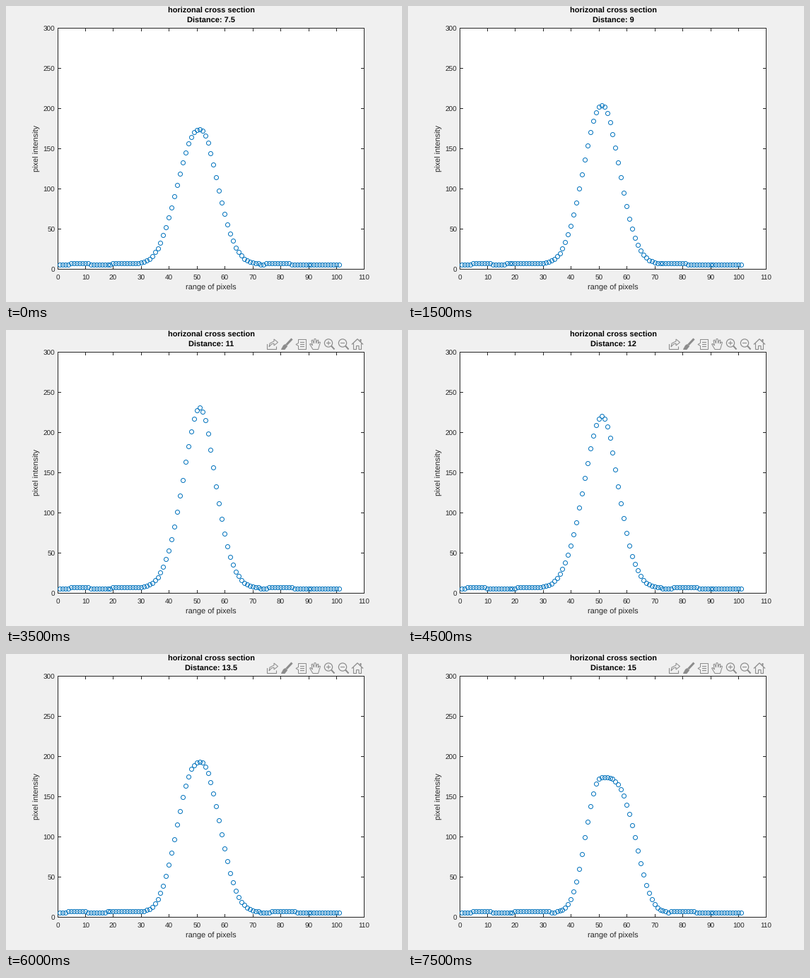
These frames come from a looping animation (560 by 420 pixels, 8 s). A matplotlib script:

```python
import numpy as np
import matplotlib.pyplot as plt
from matplotlib.animation import FuncAnimation
from matplotlib.patches import Circle, Polygon, Rectangle

W, H, DPI = 560, 420, 80
PX = 72 / DPI
STEPS, TOOLBAR_STEP = 16, 7
BLUE, INK, GREY, BACK = "#0072BD", "#262626", "#8c8c8c", "#f0f0f0"

plt.rcParams["font.family"] = "Liberation Sans"
plt.rcParams["text.hinting"] = "none"

# Bell shape at key distances: height, then width and power on each side
KEYS = [7.5, 9, 11, 12.5, 13.5, 15]
HEIGHT = [168, 198, 225, 209, 187, 168]
WIDTH_L = [7.8, 6.55, 5.95, 6.6, 7.75, 5.55]
WIDTH_R = [6.4, 6.34, 5.6, 6, 7.05, 11.4]
POWER_L = [2.2, 2, 1.85, 1.9, 2.4, 2.25]
POWER_R = [2, 2, 1.85, 1.95, 2.2, 3.4]
CENTER = 51
x = np.arange(1, 102)


def intensity(step):
    height, wl, wr, pl, pr = (
        np.interp(distance(step), KEYS, row)
        for row in (HEIGHT, WIDTH_L, WIDTH_R, POWER_L, POWER_R))
    left = x < CENTER
    r = np.abs(x - CENTER) / np.where(left, wl, wr)
    bell = 6 + height * np.exp(-r ** np.where(left, pl, pr) / 2)

    # Background of 6 with a few stretches of 7 that drift at random
    rng = np.random.default_rng(step)
    floor = np.full(x.size, 6)
    for mid, half in ((6, 3), (25, 6), (79, 4)):
        floor[np.abs(x - mid - rng.integers(-2, 3)) <= half] = 7
    return np.maximum(floor, np.round(bell))


def distance(step):
    return 7.5 + step / 2


# Data to the centre of the nearest stage pixel
def to_x(v):
    return np.floor(73 + 433.9 / 110 * v) + 0.5


def to_y(v):
    return np.floor(373.9 - 342.3 / 300 * v) + 0.5


fig = plt.figure(figsize=(W / DPI, H / DPI), dpi=DPI, facecolor=BACK)
stage = fig.add_axes([0, 0, 1, 1])
stage.set(xlim=(0, W), ylim=(H, 0))
stage.axis("off")


def line(*pts, color=GREY, lw=1.1):
    return stage.plot(*zip(*pts), color=color, lw=lw * PX, snap=False,
                      solid_capstyle="butt", solid_joinstyle="miter")[0]


def label(tx, ty, text, size=11, **kw):
    opts = dict(color=INK, ha="center", va="baseline") | kw
    return stage.text(tx, ty, text, fontsize=size * PX, **opts)


# Plot box, ticks and labels
x0, x1, y0, y1 = to_x(0), to_x(110), to_y(0), to_y(300)
stage.add_patch(Rectangle((x0, y1), x1 - x0, y0 - y1, fc="white", ec=INK,
                          lw=PX, snap=False))
TICK = 4.5
for v in range(0, 111, 10):
    tx = to_x(v)
    line((tx, y0), (tx, y0 - TICK), color=INK, lw=1)
    line((tx, y1), (tx, y1 + TICK), color=INK, lw=1)
    label(tx, 389, str(v), 10)
for v in range(0, 301, 50):
    ty = to_y(v)
    line((x0, ty), (x0 + TICK, ty), color=INK, lw=1)
    line((x1, ty), (x1 - TICK, ty), color=INK, lw=1)
    label(69.3, ty + 4, str(v), 10, ha="right")
label(290, 403, "range of pixels")
label(47, 202.3, "pixel intensity", rotation=90, rotation_mode="anchor")
label(290, 10, "horizonal cross section", weight="bold", color="black")
title = label(290, 24, "", weight="bold", color="black")

dots = stage.scatter(x, x, s=(6 * PX) ** 2, facecolors="none",
                     edgecolors=BLUE, linewidths=PX, zorder=3)

toolbar = []


def stroke(*pts, lw=1.1):
    toolbar.append(line(*pts, lw=lw))


def shape(*pts, fill=BACK):
    patch = Polygon(pts, closed=True, fc=fill, ec=GREY, lw=PX)
    toolbar.append(stage.add_patch(patch))


def lens(cx, plus):
    ring = Circle((cx, 18.5), 5.6, fc="none", ec=GREY, lw=1.2 * PX)
    toolbar.append(stage.add_patch(ring))
    stroke((cx + 4, 22.5), (cx + 8.5, 27.5), lw=2)
    stroke((cx - 3, 18.5), (cx + 3, 18.5))
    if plus:
        stroke((cx, 15.5), (cx, 21.5))


# Export
stroke((369.5, 20), (369.5, 27.5), (382.5, 27.5), (382.5, 23.5))
shape((372, 24), (373, 19), (379, 16), (379, 13),
      (384.5, 17.5), (379, 22), (379, 19), (375.5, 20))
# Brush
stroke((404.5, 12.5), (396.5, 21), lw=3)
shape((389.5, 27.5), (392.5, 22), (395, 20.5), (397.5, 23), (394, 27.5),
      fill=GREY)
# Data tip
shape((413.5, 13.5), (424.5, 13.5), (424.5, 27.5), (413.5, 27.5),
      (413.5, 22.5), (410, 20.5), (413.5, 18.5))
for y in (17.5, 20.5, 23.5):
    stroke((416, y), (422, y))
# Hand
shape((434, 27.5), (429.5, 20), (431, 19.5), (433.5, 22), (432, 15),
      (433.5, 14), (435.5, 19), (435.8, 13.2), (437, 12.3), (438.2, 13.2),
      (438.5, 19), (440, 14.5), (441.8, 14.3), (441.3, 19.5), (443, 17),
      (444.5, 17.5), (441.5, 27.5))
lens(456, True)
lens(476, False)
# Home
stroke((489, 20.5), (497, 12.8), (505, 20.5), lw=1.3)
stroke((491.5, 19), (491.5, 27.5), (495.5, 27.5), (495.5, 22.5),
       (499, 22.5), (499, 27.5), (502.5, 27.5), (502.5, 19))
stroke((501.5, 13), (501.5, 16.5), lw=2)


def draw(step):
    dots.set_offsets(np.column_stack([to_x(x), to_y(intensity(step))]))
    title.set_text(f"Distance: {distance(step):g}")
    for part in toolbar:
        part.set_visible(step >= TOOLBAR_STEP)
    return [dots, title, *toolbar]


anim = FuncAnimation(fig, draw, frames=STEPS, interval=500,
                     repeat=True, repeat_delay=0)
plt.show()
```
